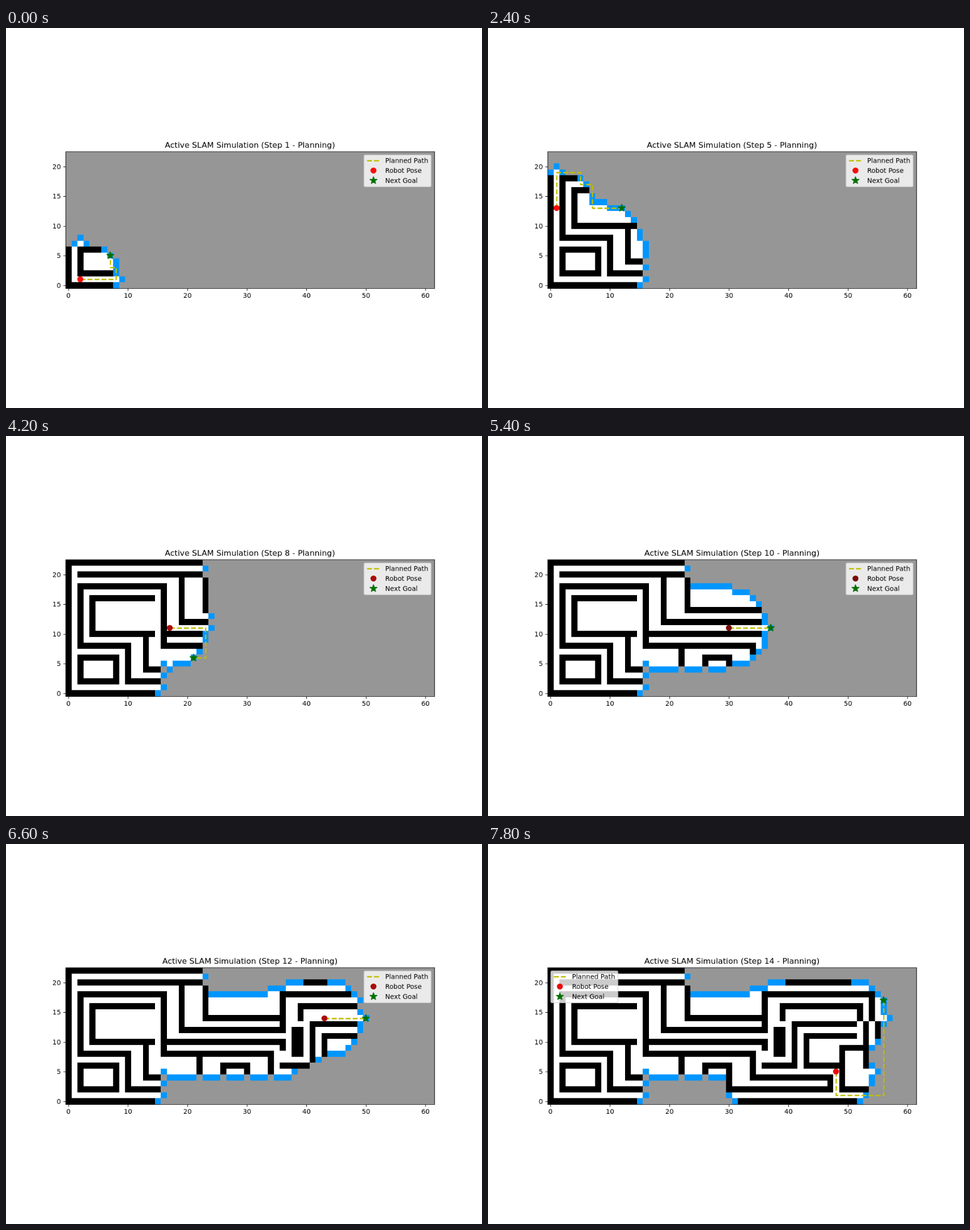
Recreate the animation shown at these times as an HTML page with a canvas. Size 837 by 669 pixels, loop 8 s.

```html
<!DOCTYPE html>
<html lang="en">
<head>
<meta charset="utf-8">
<title>Maze exploration</title>
<style>
html, body { margin: 0; width: 100%; height: 100%; overflow: hidden; background: #fff; }
canvas { display: block; width: 837px; height: 669px; }
</style>
</head>
<body>
<canvas id="stage" width="1000" height="800"></canvas>
<script>
const ctx = document.getElementById('stage').getContext('2d');

const COLS = 62, ROWS = 23, RANGE = 6, CELL = 12.5;
const LEFT = 125, RIGHT = LEFT + COLS * CELL;
const BOTTOM = 547.75, TOP = BOTTOM - ROWS * CELL;
const STEP_MS = 600, LOOP_MS = 8000;
const PT = 100 / 72; // pixels per point
const PATH_COLOR = '#bfbf00', GOAL_COLOR = '#007000';

// Walls in grid units, y upwards
const maze = new Path2D(`
  M61 0H0V22H61 M2 2H8V6H2Z M2 20H50
  M15 2H10V8H2V18H16V8H34V4H47V2H30V6H26V5
  M14 16H4V10H14 M13 10V4H15 M22 8V5
  M19 20V12H36V18H54V14 M23 19V14H36 M16 10H36V9
  M38 8V12H39V8 M39 14V16H52V14
  M51 13H41V6H36 M51 11H43V6H48
  M53 2H49V9H53 M53 13V6 M55 13V11`);

const START = [2, 1];
const GOALS = [[7, 5], [9, 7], [9, 14], [1, 13], [12, 13], [14, 11], [16, 7],
  [21, 6], [30, 11], [37, 11], [43, 14], [50, 14], [50, 7], [56, 17]];

// In order of preference: down, sideways, up
const MOVES = [[0, -1], [-1, 0], [1, 0], [0, 1]];

const inside = (x, y) => x >= 0 && y >= 0 && x < COLS && y < ROWS;
const index = (x, y) => y * COLS + x;
const neighbours = ([x, y]) => MOVES.map(([dx, dy]) => [x + dx, y + dy]);

ctx.lineWidth = 0.8;
ctx.lineCap = 'square';
const walls = Array.from({ length: COLS * ROWS },
  (_, i) => ctx.isPointInStroke(maze, i % COLS, Math.floor(i / COLS)));
ctx.lineCap = 'butt';

const seen = walls.map(() => Infinity); // step at which a cell is first sensed
const isWall = (x, y) => walls[index(x, y)];
const isKnown = (x, y, step) => inside(x, y) && seen[index(x, y)] <= step;
const isFrontier = (x, y, step) => neighbours([x, y]).some(
  ([nx, ny]) => isKnown(nx, ny, step) && !isWall(nx, ny));

function sense([cx, cy], step) {
  for (let y = cy - RANGE; y <= cy + RANGE; y++) {
    for (let x = cx - RANGE; x <= cx + RANGE; x++) {
      if (inside(x, y) && (x - cx) ** 2 + (y - cy) ** 2 <= RANGE ** 2) {
        seen[index(x, y)] = Math.min(seen[index(x, y)], step);
      }
    }
  }
}

// Shortest path in which unknown cells count as free
function findPath(from, goal, step) {
  const dist = walls.map(() => Infinity);
  const queue = [goal];
  dist[index(...goal)] = 0;
  for (const cell of queue) {
    for (const [x, y] of neighbours(cell)) {
      if (!inside(x, y) || dist[index(x, y)] < Infinity) continue;
      if (isKnown(x, y, step) && isWall(x, y)) continue;
      dist[index(x, y)] = dist[index(...cell)] + 1;
      queue.push([x, y]);
    }
  }
  const path = [from];
  for (let d = dist[index(...from)]; d > 0; d--) {
    path.push(neighbours(path.at(-1)).find(
      ([x, y]) => inside(x, y) && dist[index(x, y)] === d - 1));
  }
  return path;
}

// The robot follows each plan until it bumps into a wall
let robot = START;
sense(robot, 0);
const plans = GOALS.map((goal, step) => {
  const path = findPath(robot, goal, step);
  for (const cell of path) {
    if (isWall(...cell)) break;
    robot = cell;
    sense(robot, step + 1);
  }
  return path;
});

const px = x => LEFT + (x + 0.5) * CELL;
const py = y => BOTTOM - (y + 0.5) * CELL;
const snap = v => Math.round(v) + 0.5;

function text(str, x, y, points, align) {
  ctx.font = `${points * PT}px "DejaVu Sans", sans-serif`;
  ctx.textAlign = align;
  ctx.fillStyle = '#000';
  ctx.fillText(str, x, y);
}

function drawMap(step) {
  ctx.fillStyle = '#969696';
  ctx.fillRect(LEFT, TOP, RIGHT - LEFT, BOTTOM - TOP);
  for (let y = 0; y < ROWS; y++) {
    for (let x = 0; x < COLS; x++) {
      if (isKnown(x, y, step)) ctx.fillStyle = isWall(x, y) ? '#000' : '#fff';
      else if (isFrontier(x, y, step)) ctx.fillStyle = '#0096ff';
      else continue;
      const x0 = Math.round(px(x - 0.5)), y0 = Math.round(py(y + 0.5));
      ctx.fillRect(x0, y0, Math.round(px(x + 0.5)) - x0, Math.round(py(y - 0.5)) - y0);
    }
  }
}

function dashedLine(points) {
  ctx.beginPath();
  for (const [x, y] of points) ctx.lineTo(snap(x), snap(y));
  ctx.setLineDash([7.4 * PT, 3.2 * PT]);
  ctx.lineWidth = 2 * PT;
  ctx.lineJoin = 'round';
  ctx.strokeStyle = PATH_COLOR;
  ctx.stroke();
  ctx.setLineDash([]);
}

function paintMarker(color) {
  ctx.fillStyle = ctx.strokeStyle = color;
  ctx.lineWidth = PT;
  ctx.lineJoin = 'bevel';
  ctx.fill();
  ctx.stroke();
}

function dot(x, y, color) {
  ctx.beginPath();
  ctx.arc(Math.round(x), Math.round(y), 4 * PT, 0, 2 * Math.PI);
  paintMarker(color);
}

function star(x, y) {
  ctx.beginPath();
  for (let i = 0; i < 10; i++) {
    const r = 6 * PT * (i % 2 ? 0.382 : 1), a = i * Math.PI / 5;
    ctx.lineTo(Math.round(x) + r * Math.sin(a), Math.round(y) - r * Math.cos(a));
  }
  ctx.closePath();
  paintMarker(GOAL_COLOR);
}

function drawAxes(step) {
  ctx.strokeStyle = '#000';
  ctx.lineWidth = 0.8 * PT;
  ctx.lineJoin = 'miter';
  ctx.beginPath();
  ctx.rect(snap(LEFT), snap(TOP), RIGHT - LEFT, snap(BOTTOM) - snap(TOP));
  for (let v = 0; v < COLS; v += 10) {
    ctx.moveTo(snap(px(v)), snap(BOTTOM));
    ctx.lineTo(snap(px(v)), snap(BOTTOM) + 5);
    text(v, px(v), 568, 10, 'center');
  }
  for (let v = 0; v < ROWS; v += 5) {
    ctx.moveTo(snap(LEFT), snap(py(v)));
    ctx.lineTo(snap(LEFT) - 5, snap(py(v)));
    text(v, LEFT - 7 * PT, Math.round(py(v) + 5), 10, 'right');
  }
  ctx.stroke();
  text(`Active SLAM Simulation (Step ${step + 1} - Planning)`,
    (LEFT + RIGHT) / 2, 252, 12, 'center');
}

function drawLegend(step, robotColor) {
  const width = 141, pad = 5 * PT;
  const x = step < 12 ? RIGHT - pad - width : LEFT + pad;
  const row = i => 279.3 + i * 20.8;
  ctx.beginPath();
  ctx.roundRect(x, TOP + pad, width, 67, 2 * PT);
  ctx.fillStyle = 'rgba(255,255,255,.8)';
  ctx.strokeStyle = 'rgba(204,204,204,.8)';
  ctx.lineWidth = PT;
  ctx.fill();
  ctx.stroke();
  const handle = x + 4 * PT, middle = handle + 10 * PT;
  dashedLine([[handle, row(0)], [handle + 20 * PT, row(0)]]);
  dot(middle, row(1), robotColor);
  star(middle, row(2));
  ['Planned Path', 'Robot Pose', 'Next Goal'].forEach(
    (label, i) => text(label, handle + 28 * PT, Math.round(row(i) + 4.8), 10, 'left'));
}

function draw(step) {
  const points = plans[step].map(([x, y]) => [px(x), py(y)]);
  const red = 255 - 135 * Math.exp(-(((step - 9) / 3) ** 2));
  const robotColor = `rgb(${Math.round(red)}, 12, 10)`;
  ctx.fillStyle = '#fff';
  ctx.fillRect(0, 0, 1000, 800);
  drawMap(step);
  dashedLine(points);
  dot(...points[0], robotColor);
  star(...points.at(-1));
  drawAxes(step);
  drawLegend(step, robotColor);
}

const start = performance.now();
function tick() {
  const t = (performance.now() - start) % LOOP_MS;
  draw(Math.min(plans.length - 1, Math.floor(t / STEP_MS)));
  requestAnimationFrame(tick);
}
tick();
</script>
</body>
</html>
```
